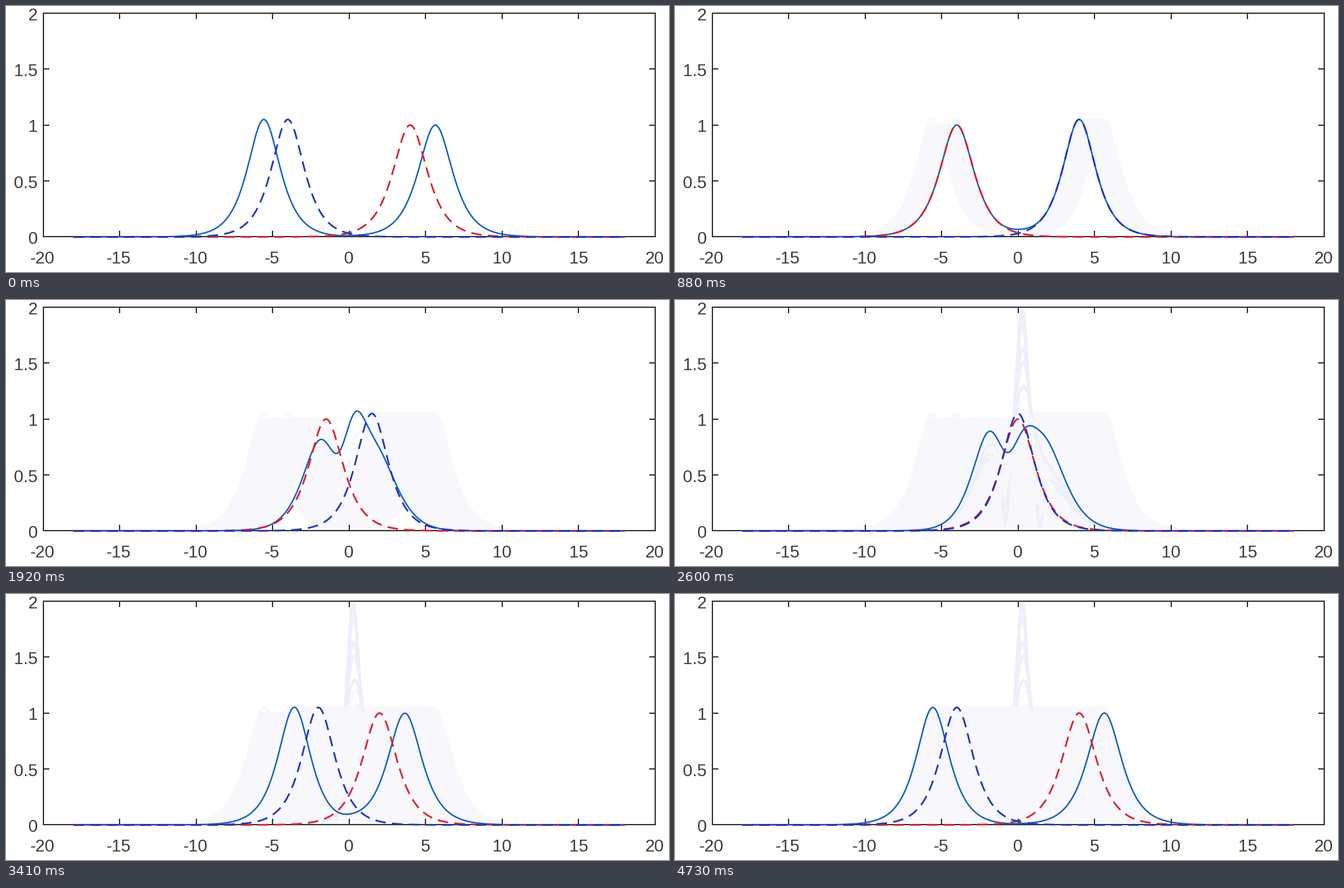
Write a matplotlib script that moves like this. It is 1010 by 406 pixels and loops after 4.81 s.

```python
import numpy as np
import matplotlib.pyplot as plt
from matplotlib.animation import FuncAnimation
from matplotlib.collections import LineCollection

W, H, DPI = 1010, 406, 100
PX = 72 / DPI                       # one pixel in points
LEFT, RIGHT, TOP, BOTTOM = 56.5, 988.5, 11, 352.5
INK, SOLID, RED, BLUE = "#3a3a3a", "#0b5fc4", "#e01f2d", "#1e36c4"
FAINT, TRACE = "#f8f8fc", "#edf0f8"

# Two bright solitons of the cubic Schrodinger equation: amplitudes, velocities
A1, A2, V = 1.0, 1.05, 0.5
T_START, T_END, DT = -12.0, 8.0, 0.2
L1, L2 = A1 + 1j * V, A2 - 1j * V
S = L1 + np.conj(L2)
SHIFT = np.log(abs(S / (L1 - L2)))
TWIST = np.angle((L1 - L2) / S) + np.angle((L2 - L1) / np.conj(S))

FIRST, LAST, STEPS = 3, 64, 65
x = np.linspace(-18, 18, 1201)


def sech(a, center):
    return a / np.cosh(a * (x - center))


def collide(t):
    """Modulus of the exact two-soliton solution."""
    u = A1 * (x - V * t) - SHIFT
    w = A2 * (x + V * t) + SHIFT
    phase = 2 * V * x + (A1**2 - A2**2) / 2 * (t - T_START) + TWIST
    det = (np.cosh(u) * np.cosh(w) / (A1 * A2)
           - 2 * (np.cosh(u + w) + np.cos(phase)) / abs(S) ** 2)
    c1 = np.cosh(u) / A1 - np.exp(-u) / S - np.exp(u) / np.conj(S)
    c2 = np.cosh(w) / A2 - np.exp(w) / S - np.exp(-w) / np.conj(S)
    return np.abs(np.exp(-1j * phase) * c1 + c2) / det


def time_at(step):
    if step < FIRST:
        return T_END
    return min(T_END, DT * np.floor(1.75 * step - 60.4))


def curves(t):
    return collide(t), sech(A1, V * t), sech(A2, -V * t)


times = [time_at(k) for k in range(STEPS)]
shapes = [curves(t) for t in times]

# the small excess keeps the pixel size from rounding down
fig = plt.figure(figsize=((W + 0.01) / DPI, (H + 0.01) / DPI), dpi=DPI, facecolor="white")
ax = fig.add_axes([LEFT / W, 1 - BOTTOM / H, (RIGHT - LEFT) / W, (BOTTOM - TOP) / H])
ax.set(xlim=(-20, 20), ylim=(0, 2),
       xticks=np.arange(-20, 21, 5), yticks=np.arange(0, 2.1, 0.5))
ax.tick_params(direction="in", top=True, right=True, length=9 * PX, width=2 * PX,
               color=INK, labelbottom=False, labelleft=False)
for spine in ax.spines.values():
    spine.set(linewidth=2 * PX, color=INK)


def label(px, py, s, ha):
    fig.text(px / W, 1 - py / H, s, ha=ha, va="baseline", color=INK,
             family="Liberation Sans", size=26 * PX)


for v in range(-20, 21, 5):
    label(LEFT + (v + 20) / 40 * (RIGHT - LEFT) - (1 if v < 0 else 0), 393, str(v), "center")
for v in (0, 0.5, 1, 1.5, 2):
    label(48, BOTTOM - v / 2 * (BOTTOM - TOP) + 10.5, f"{v:g}", "right")

trail = LineCollection([], linewidths=4 * PX, zorder=1)
ax.add_collection(trail, autolim=False)


def line(color, width, z, **kw):
    return ax.plot([], [], color=color, lw=width * PX, zorder=z, clip_on=False, **kw)[0]


dash = dict(linestyle=(0, (16 / 2.6, 9.5 / 2.6)), dash_capstyle="butt")
lines = [line(SOLID, 2.2, 4), line(RED, 2.6, 5, **dash), line(BLUE, 2.6, 6, **dash)]


def trail_of(step):
    segs, colors = [], []
    if step >= FIRST:
        for k in range(FIRST - 1, step):
            near = abs(times[k] + 1.5) < 1.2
            for y in shapes[k]:
                segs.append(np.column_stack([x[::4], y[::4]]))
                colors.append(TRACE if near and y is shapes[k][0] else FAINT)
    return segs, colors


def draw(i):
    step = min(LAST, (i + 1) // 2)
    segs, colors = trail_of(step)
    trail.set_segments(segs)
    trail.set_color(colors or [FAINT])
    for ln, y in zip(lines, shapes[step]):
        ln.set_data(x, np.where(y > 2, np.nan, y))
    return [trail, *lines]


anim = FuncAnimation(fig, draw, frames=2 * STEPS, interval=37, repeat=True,
                     repeat_delay=0, blit=False)
plt.show()
```
